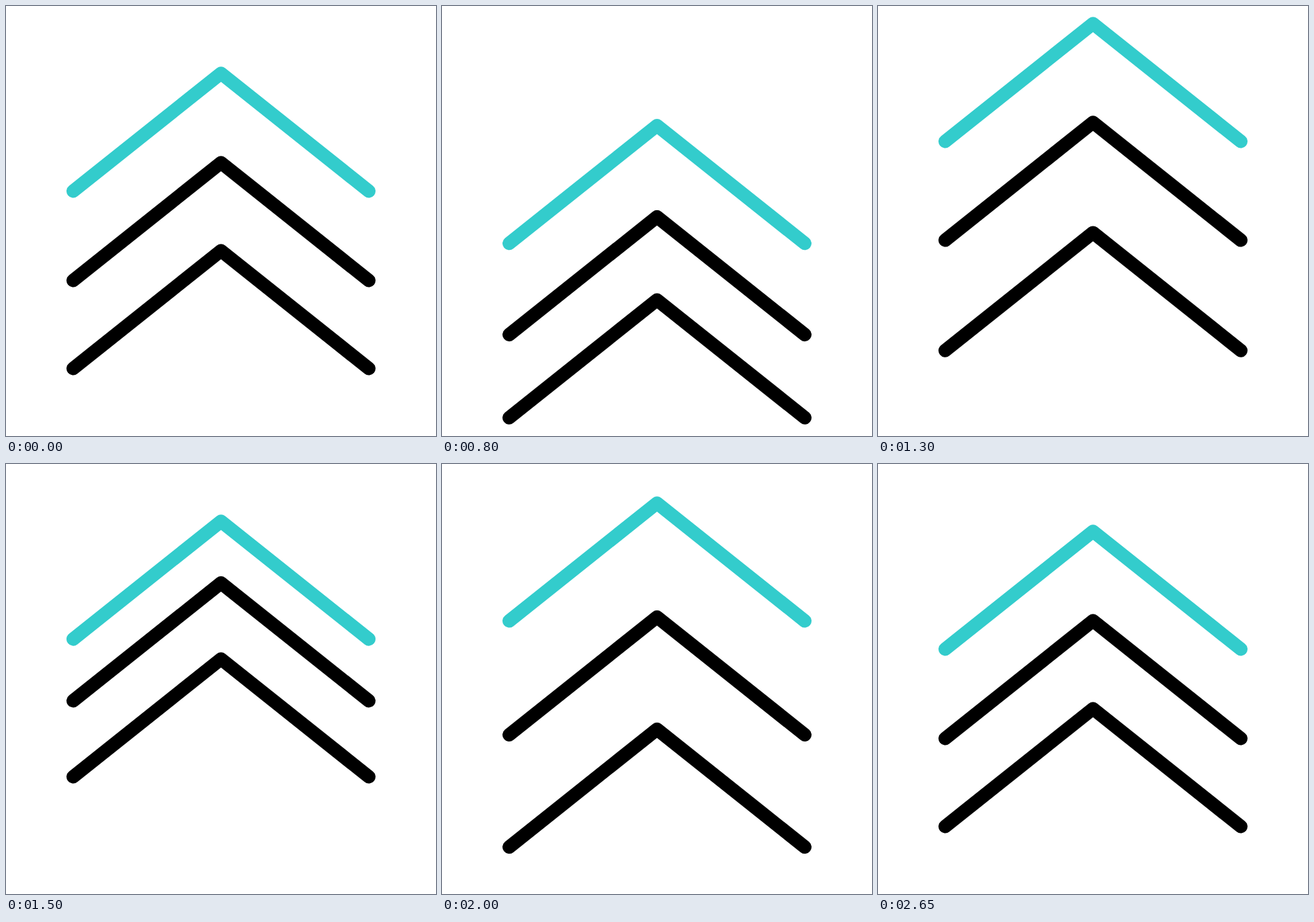
Write an HTML page that moves like this. It is 640x640 px and loops after 2700 ms.

```html
<!DOCTYPE html>
<html lang="en">
<head>
<meta charset="utf-8">
<title>Chevrons</title>
<style>
  html, body { margin: 0; width: 100%; height: 100%; overflow: hidden; background: #fff; }
  svg { display: block; width: 100vw; height: 100vh; }
  path { fill: none; stroke: #000; stroke-width: 20; stroke-linecap: round; stroke-linejoin: round; }
  .lead { stroke: #33cccc; }
</style>
</head>
<body>
<svg viewBox="0 0 640 640">
  <path class="lead" d="M100 275.5 320 100.2 540 275.5"/>
  <path d="M100 408.5 320 233.2 540 408.5"/>
  <path d="M100 539.5 320 364.2 540 539.5"/>
</svg>
<script>
  const LOOP = 2700, STEP = 50, DELAY = 100;
  // [time in ms, vertical offset]
  const KEYS = [[0, 0], [748, 81.6], [1303, -74], [1702, 46.5], [2102, -59], [2450, 0]];
  const chevrons = document.querySelectorAll('path');

  const ease = x => x * x * (3 - 2 * x);

  function offset(t) {
    if (t <= 0) return 0;
    for (let i = 1; i < KEYS.length; i++) {
      const [t0, y0] = KEYS[i - 1], [t1, y1] = KEYS[i];
      if (t < t1) return y0 + (y1 - y0) * ease((t - t0) / (t1 - t0));
    }
    return 0;
  }

  function draw(ms) {
    const t = Math.floor((ms % LOOP) / STEP) * STEP;
    chevrons.forEach((el, i) => {
      el.setAttribute('transform', `translate(0 ${offset(t - i * DELAY).toFixed(2)})`);
    });
  }

  let start = null;
  function tick(now) {
    if (start === null) start = now;
    draw(now - start);
    requestAnimationFrame(tick);
  }
  draw(0);
  requestAnimationFrame(tick);
</script>
</body>
</html>
```
